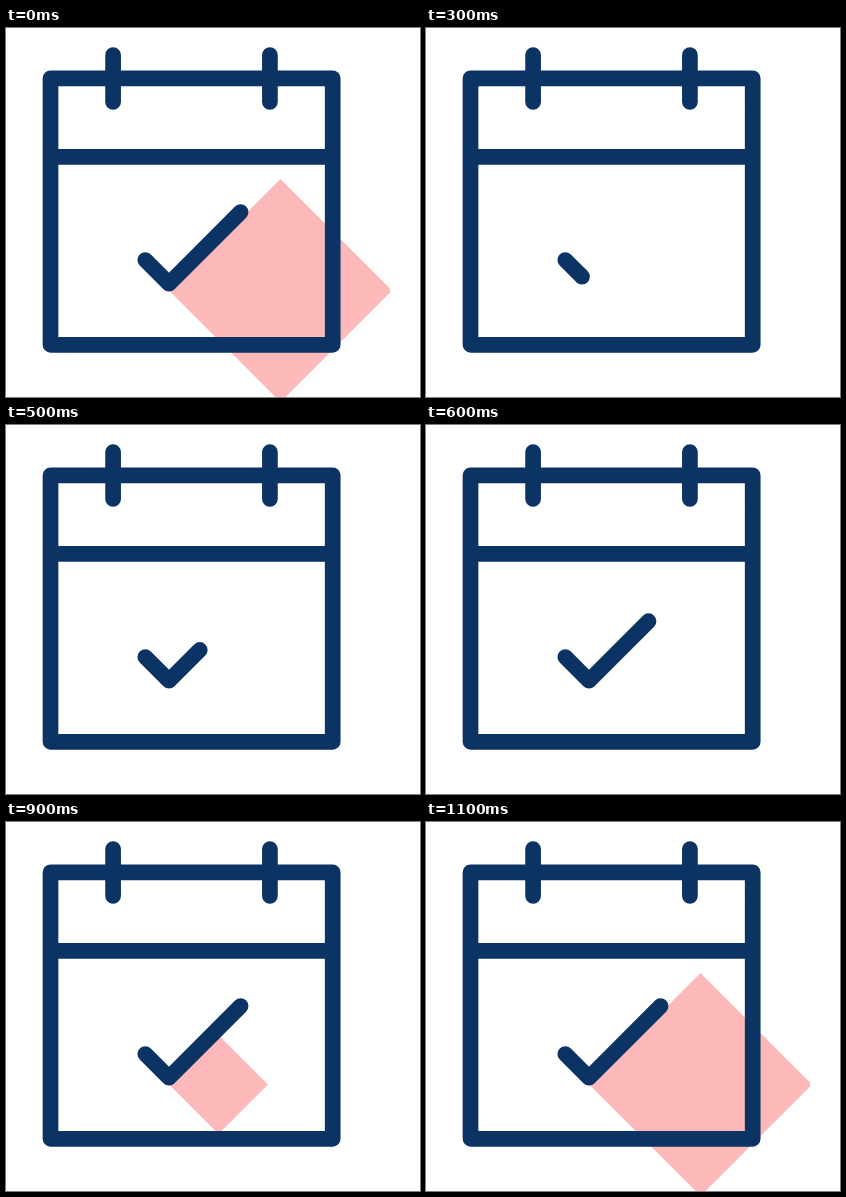
An HTML page that plays this animation: 414 px wide and 369 px high, repeating every 1200 ms.

```html
<!DOCTYPE html>
<html lang="en">
<head>
<meta charset="utf-8">
<title>Calendar check</title>
<style>
  html, body { margin: 0; width: 100%; height: 100%; overflow: hidden; background: #fff; }
  svg { display: block; }
</style>
</head>
<body>
<svg width="414" height="369" viewBox="0 0 414 369">
  <clipPath id="edge"><rect width="384" height="369"/></clipPath>
  <g clip-path="url(#edge)"><path id="diamond" fill="#fdb8ba"/></g>
  <g fill="none" stroke="#0b3364" stroke-width="15.7" stroke-linecap="round" stroke-linejoin="round">
    <path d="M44.5 50.3H326.7V316.8H44.5ZM44.5 128.8H326.7M107.1 27V74M263.9 27V74"/>
    <path id="check"/>
  </g>
</svg>
<script>
const LOOP = 1200, STEP = 100;
const diamond = document.getElementById('diamond');
const check = document.getElementById('check');

// Linear progress between two times, limited to 0..1
const progress = (t, from, to) => Math.min(1, Math.max(0, (t - from) / (to - from)));

function draw(time) {
  // The picture advances in steps; the first one holds the finished pose
  const t = Math.floor((time % LOOP) / STEP) * STEP || LOOP;
  const down = 23.7 * progress(t, 80, 393);
  const up = 71.6 * progress(t, 393, 642);
  const half = 111.5 * progress(t, 767, 1067);

  check.setAttribute('d', `M139.3 232l${down} ${down}` + (up ? `l${up} ${-up}` : ''));
  diamond.setAttribute('d', `M163 262.5l${half} ${-half}l${half} ${half}l${-half} ${half}Z`);
}

const start = performance.now();
function tick() {
  draw(performance.now() - start);
  requestAnimationFrame(tick);
}
tick();
</script>
</body>
</html>
```
